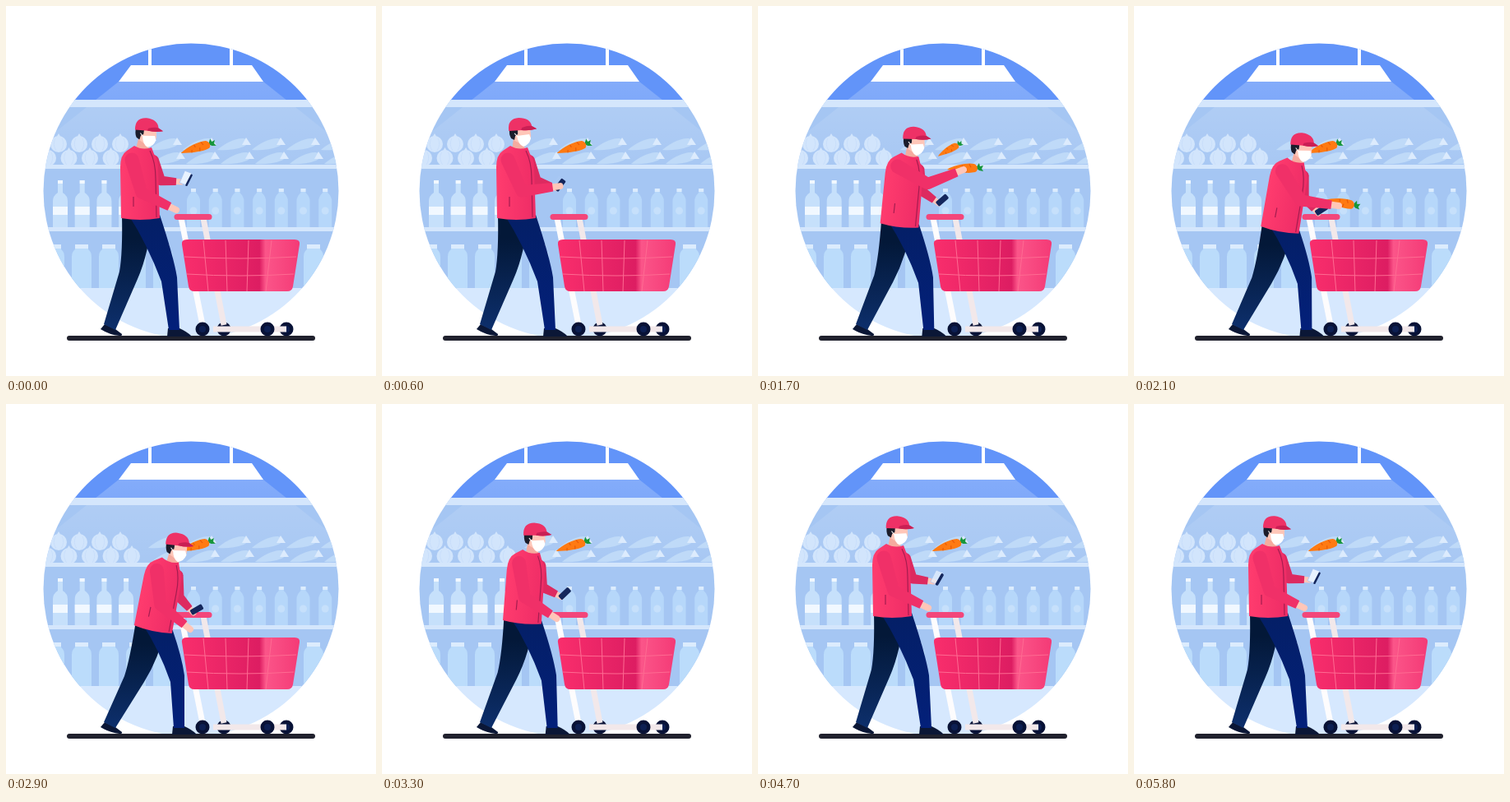
Animation, 450 px wide and 450 px high, one loop 6 s. Source, as an HTML page:

```html
<!DOCTYPE html>
<html lang="en">
<head>
<meta charset="utf-8">
<title>Shopping for groceries</title>
<style>
html, body { margin: 0; width: 100%; height: 100%; overflow: hidden; background: #fff; }
svg { display: block; width: 100vw; height: 100vh; }
</style>
</head>
<body>
<svg viewBox="0 0 450 450">
  <defs>
    <clipPath id="disc"><circle cx="225" cy="225" r="179.5"/></clipPath>
    <linearGradient id="beam" x2="0" y2="1"><stop stop-color="#fff" stop-opacity=".16"/><stop offset="1" stop-color="#fff" stop-opacity=".03"/></linearGradient>
    <linearGradient id="coat"><stop stop-color="#ff3c6e"/><stop offset="1" stop-color="#ee2c66"/></linearGradient>
    <linearGradient id="tub"><stop stop-color="#f92e6c"/><stop offset=".66" stop-color="#dd1d62"/><stop offset=".71" stop-color="#fb5589"/><stop offset="1" stop-color="#f43a76"/></linearGradient>
    <linearGradient id="rearCloth" x2="0" y2="1"><stop offset=".2" stop-color="#031838"/><stop offset="1" stop-color="#0d2f6c"/></linearGradient>
    <linearGradient id="foreCloth" x2="0" y2="1"><stop stop-color="#041f66"/><stop offset="1" stop-color="#03207a"/></linearGradient>
    <g id="carrot">
      <path d="M-1 0L3-6 4-2 8-3 6 1 8 4 3 3Z" fill="#17963c"/>
      <path d="M-36 1C-27-4-11-7-3-5 2-3 2 4-2 5-11 7-26 4-36 1Z" fill="#ff7a12"/>
      <path d="M-9-5l2 4M-18-4l1 3M-13 5l1-4M-23 4l1-3" stroke="#e85a08" stroke-width="1.2"/>
    </g>
    <g id="paleCarrot">
      <path d="M-35 10C-26 2-12-5-3-4 3-3 3 4-3 6-13 10-26 11-35 10Z" fill="#bfdaf8"/>
      <path d="M-5 4L0-5 6 4Z" fill="#dcebfd"/>
    </g>
    <g id="onion" fill="#d2e5fc">
      <circle r="10"/><path d="M-3-8L0-13 3-8Z"/>
      <path d="M-4-7Q-8 0-3 8M4-7Q8 0 3 8" fill="none" stroke="#c5dcfa" stroke-width=".7"/>
    </g>
    <g id="wine">
      <path d="M-3 0H3V15Q9 19 9 25V57H-9V25Q-9 19-3 15Z" fill="#c6e0fb"/>
      <path d="M-3 0H3V4H-3ZM-9 32H9V42H-9Z" fill="#f1f8ff"/>
    </g>
    <g id="water">
      <path d="M-3 0H3V5Q8 10 8 15V47H-8V15Q-8 10-3 5Z" fill="#b6d7fa"/>
      <path d="M-3 0H3V4H-3Z" fill="#dcecfd"/><circle cy="27" r="4.5" fill="#c6e0fb"/>
    </g>
    <g id="milk">
      <path d="M-8 0H8V6Q12 9 12 15V53H-12V15Q-12 9-8 6Z" fill="#bbdcfb"/>
      <path d="M-8 0H8V5H-8Z" fill="#dcecfd"/>
    </g>
    <g id="wheel"><circle r="8.5" fill="#081236"/><circle r="4" fill="#0d1f52"/></g>
  </defs>

  <g clip-path="url(#disc)">
    <path d="M45 45H405V115H45Z" fill="#6294f9"/>
    <path d="M137 92H313L342 115H108Z" fill="#6c9cf9"/>
    <path d="M45 114H405V344H45Z" fill="#a5c6f3"/>
    <path d="M45 343H405V405H45Z" fill="#d6e8fe"/>
    <path d="M137 92H313L440 193H10Z" fill="url(#beam)"/>
    <path d="M173 45h4v28h-4zM272 45h4v28h-4zM152 72H299L313 92H137Z" fill="#fff"/>
    <g id="goods"></g>
    <path d="M40 114H410V123H40ZM40 193H410V198H40ZM40 269H410V274H40Z" fill="#d4e6fc"/>
  </g>
  <rect x="74" y="401" width="302" height="6" rx="3" fill="#20212d"/>
  <use href="#carrot" id="spare"/>

  <g fill="none" stroke-width="7">
    <path d="M213 258L239 388" stroke="#fdfcfd"/>
    <use href="#wheel" x="265" y="393"/><use href="#wheel" x="341" y="393"/>
    <path d="M240 258L265 388M252 393H341" stroke="#f2e8ea"/>
    <use href="#wheel" x="239" y="393"/><use href="#wheel" x="318" y="393"/>
    <path d="M208 256.500H247" stroke="#f3467a" stroke-linecap="round"/>
  </g>

  <path id="farHand" stroke="#ffc6b8" stroke-width="7" stroke-linecap="round"/>
  <path id="farSleeve" fill="#dd2a60"/>
  <g id="phone">
    <path id="screen" d="M-8-8L1-9 1 7-7 8Z" fill="#e8f2ff" stroke="#a9c6f3" stroke-width=".8"/>
    <rect id="case" y="-8" height="16" rx="1.500" fill="#14265c"/>
  </g>

  <path d="M120 387L133 393 141 399Q142 401 138 401 126 400 115 393Z" fill="#0b1736"/>
  <path id="rearLeg" fill="url(#rearCloth)"/>
  <path id="foreShoe" d="M197 392H211Q220 396 225 401V402H196Z" fill="#0b1736"/>
  <path id="foreLeg" fill="url(#foreCloth)"/>

  <g id="torso">
    <g id="head">
      <path d="M160 160L173 166 174 178 158 176Z" fill="#f5ab9f"/>
      <path d="M157 149H180L181 158Q180 168 171 169L160 163Z" fill="#ffc6b8"/>
      <path d="M155 149H165L165 156 162 158 161 163 157 161Q154 156 155 149Z" fill="#1b1c2b"/>
      <path d="M164 158L179 156 181 161Q179 169 172 171 166 169 164 158Z" fill="#fff"/>
      <path d="M165 159L161 155" stroke="#fff"/>
      <path d="M154 152Q152 137 166 136 180 136 182 146L188 149Q180 152 170 151Z" fill="#ee3166"/>
      <path d="M170 148Q178 145 182 146L188 149Q179 152 169 151Z" fill="#c91f54"/>
    </g>
    <path d="M156 170Q166 176 177 172L180 180Q185 186 185 196L187 258Q163 262 140 258L139 196Q139 181 147 176Z" fill="url(#coat)"/>
    <path d="M175 176Q182 190 182 210L183 257M155 232V244" fill="none" stroke="#a51d50" stroke-width="1.200"/>
  </g>

  <use href="#carrot" id="taken"/>
  <path id="nearHand" stroke="#ffc6b8" stroke-width="8" stroke-linecap="round"/>
  <path id="nearSleeve" fill="#f03068"/>

  <path d="M220 284H351Q358 284 357 290L349 341Q348 347 342 347H229Q223 347 222 341L214 290Q213 284 220 284Z" fill="url(#tub)"/>
  <path d="M217 305Q285 309 353 305M220 326Q285 330 350 326M240 285L246 347M267 285L269 347M295 285L293 347M323 285L316 347" fill="none" stroke="#ff6b92" stroke-width="1"/>
</svg>
<script>
const LOOP = 6000;
const $ = id => document.getElementById(id);
const set = (id, name, value) => $(id).setAttribute(name, value);

// Shelf stock
const row = (kind, x, y, step, count) => Array.from({ length: count }, (_, i) =>
  `<use href="#${kind}" x="${x + i * step}" y="${y}"/>`).join('');
$('goods').innerHTML =
  row('onion', 64, 168, 25, 4) + row('onion', 51, 185, 25.5, 5) +
  row('paleCarrot', 208, 165, 42, 6) + row('paleCarrot', 212, 182, 42, 6) +
  row('wine', 66, 212, 26.7, 4) + row('water', 228, 222, 26.7, 7) +
  row('milk', 59, 290, 33, 5) + row('milk', 374, 290, 33, 1);

// Keys are [time, value, ...]; monotone cubic interpolation passes through each.
function track(keys, t) {
  const last = keys.length - 1;
  if (t <= keys[0][0]) return keys[0].slice(1);
  if (t >= keys[last][0]) return keys[last].slice(1);
  const i = keys.findIndex(k => k[0] > t) - 1;
  const span = keys[i + 1][0] - keys[i][0], u = (t - keys[i][0]) / span;
  return keys[i].slice(1).map((a, n) => {
    const slope = j => j < 0 || j >= last ? 0 :
      (keys[j + 1][n + 1] - keys[j][n + 1]) / (keys[j + 1][0] - keys[j][0]);
    const tangent = j => {
      const p = slope(j - 1), q = slope(j);
      return p * q > 0 ? 2 * p * q / (p + q) : 0;
    };
    const b = keys[i + 1][n + 1], v = 1 - u;
    return a * v * v * (1 + 2 * u) + b * u * u * (3 - 2 * u) +
      span * u * v * (tangent(i) * v - tangent(i + 1) * u);
  });
}

const lean = [[1100, 0], [1700, .55], [2100, .9], [2450, 1], [2900, 1], [3650, 0]];
const tilt = [[0, 8], [700, 0], [4300, 0], [5000, 8]];
const nearHand = [[300, 207, 248], [1000, 231, 175], [1150, 231, 175], [1700, 250, 199],
  [2100, 249, 243], [2400, 250, 258], [2900, 224, 274], [3700, 207, 248]];
const farHand = [[0, 214, 214], [700, 212, 222], [1150, 212, 222], [1700, 220, 240],
  [2100, 224, 252], [2400, 228, 254], [2900, 228, 254], [3600, 212, 222], [4300, 212, 222], [4900, 214, 214]];
const phone = [[0, 27, 1], [700, 38, 0], [1150, 38, 0], [1700, 49, 0], [2400, 60, 0],
  [2900, 60, 0], [3600, 38, 0], [4300, 38, 0], [4900, 27, 1]];
const taken = [[900, 247, 168, -16], [1100, 246, 163, -27], [1700, 266, 197, -1],
  [1900, 270, 217, 4], [2100, 267, 242, 11], [2400, 270, 270, 35], [2650, 274, 310, 50]];
const spare = [[1300, 236, 174, -45, 0], [1700, 243, 169, -28, .77], [2050, 246, 168, -16, 1]];

const HIP = [163, 255];

// Position of a torso point at lean amount l
function onTorso(x, y, l) {
  const a = 12 * l * Math.PI / 180, c = Math.cos(a), s = Math.sin(a);
  x -= HIP[0];
  y -= HIP[1];
  return [HIP[0] + 16 * l + x * c - y * s, HIP[1] + 16 * l + x * s + y * c];
}

const disk = (x, y, r) => `M${x - r} ${y}a${r} ${r} 0 1 1 ${2 * r} 0a${r} ${r} 0 1 1 ${-2 * r} 0Z`;

// Tapered bone with flat ends
function bone(x, y, r, x2, y2, r2) {
  const d = Math.hypot(x2 - x, y2 - y), nx = (y - y2) / d, ny = (x2 - x) / d;
  return `M${x - nx * r} ${y - ny * r}L${x2 - nx * r2} ${y2 - ny * r2} ` +
    `${x2 + nx * r2} ${y2 + ny * r2} ${x + nx * r} ${y + ny * r}Z`;
}

// Two-bone arm with the elbow hanging below the shoulder-hand line
function arm(side, [sx, sy], [hx, hy], upper, fore, cuff, r) {
  const dx = hx - sx, dy = hy - sy, d = Math.hypot(dx, dy);
  const along = (upper * upper - fore * fore + d * d) / (2 * d);
  const drop = Math.sqrt(Math.max(0, upper * upper - along * along));
  const ex = sx + (dx * along - dy * drop) / d, ey = sy + (dy * along + dx * drop) / d;
  const k = 1 - cuff / Math.hypot(hx - ex, hy - ey);
  const wx = ex + (hx - ex) * k, wy = ey + (hy - ey) * k;
  const elbow = r * .85;
  set(side + 'Sleeve', 'd', disk(sx, sy, r) + bone(sx, sy, r, ex, ey, elbow) +
    disk(ex, ey, elbow) + bone(ex, ey, elbow, wx, wy, r * .62));
  set(side + 'Hand', 'd', `M${wx} ${wy}L${hx} ${hy}`);
}

function legs(l) {
  const hip = (x, y) => onTorso(x, y, l).join(' ');
  const at = (x, y, dx, dy) => `${x + dx * l} ${y + dy * l}`;
  set('rearLeg', 'd', `M${hip(141, 254)}L${hip(178, 254)}Q${at(174, 300, 12, 9)} ${at(160, 332, 8, 6)}` +
    `L133 394 119 387 ${at(138, 323, 6, 8)}Q${at(142, 300, 9, 9)} ${hip(141, 254)}Z`);
  set('foreLeg', 'd', `M${hip(149, 254)}L${hip(187, 254)}Q${at(204, 305, 10, 3)} ${at(208, 330, 9, 0)}` +
    `L${at(211, 394, 6, 0)} ${at(198, 394, 6, 0)} ${at(189, 335, 11, 3)}Q${at(172, 290, 14, 8)} ${hip(149, 254)}Z`);
  set('foreShoe', 'transform', `translate(${6 * l})`);
}

function draw(now) {
  const t = now % LOOP;
  const [l] = track(lean, t), [nod] = track(tilt, t);
  const near = track(nearHand, t), far = track(farHand, t);
  const [turn, lit] = track(phone, t), [cx, cy, spin] = track(taken, t);
  const [px, py, slant, size] = track(spare, t);

  set('torso', 'transform', `translate(${16 * l} ${16 * l}) rotate(${12 * l} ${HIP})`);
  set('head', 'transform', `translate(${4 * l} ${l}) rotate(${nod - 3 * l} 166 172)`);
  legs(l);
  arm('near', onTorso(153, 187, l), near, 42, 47, 9, 8.5);
  arm('far', onTorso(179, 188, l), far, 26, 26, 7, 7);

  set('phone', 'transform', `translate(${far[0] + 4 + 3 * lit} ${far[1] - 4 + lit}) rotate(${turn})`);
  set('screen', 'opacity', lit);
  set('case', 'x', -3.5 + 4 * lit);
  set('case', 'width', 7 - 4.5 * lit);

  set('taken', 'transform', `translate(${cx} ${cy}) rotate(${spin})`);
  set('taken', 'visibility', t < 2650 ? 'visible' : 'hidden');
  set('spare', 'transform', `translate(${px} ${py}) rotate(${slant}) scale(${size})`);
  requestAnimationFrame(draw);
}
requestAnimationFrame(draw);
</script>
</body>
</html>
```
